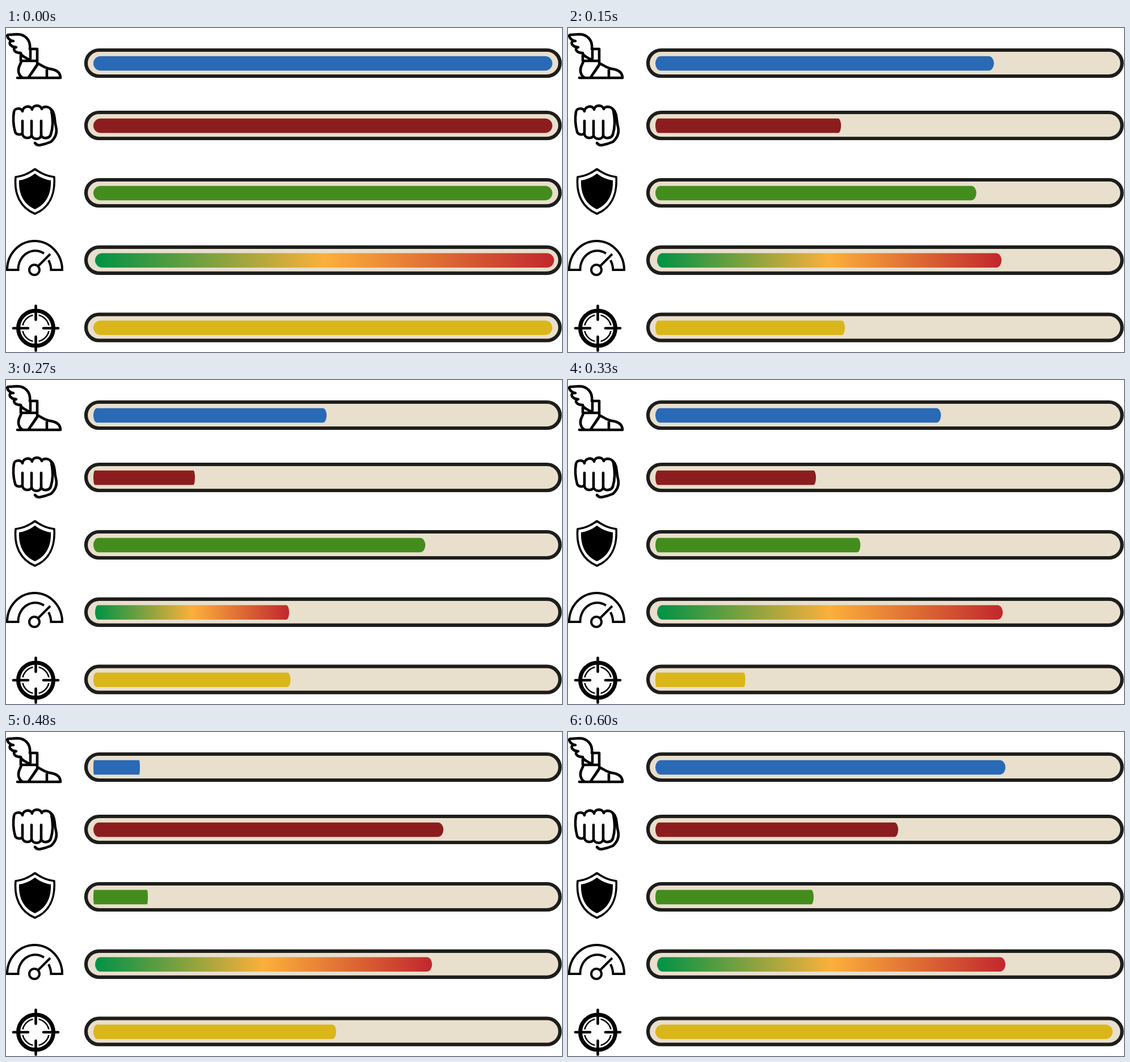
These frames come from a looping animation (980 by 572 pixels, 670 ms). An HTML page:

```html
<!DOCTYPE html>
<html lang="en">
<head>
<meta charset="utf-8">
<title>Stat bars</title>
<style>
  html, body { margin: 0; width: 100%; height: 100%; overflow: hidden; background: #fff; }
  svg { display: block; }
  .icon { fill: none; stroke: #000; stroke-width: 4.6; stroke-linecap: round; stroke-linejoin: round; }
</style>
</head>
<body>
<svg id="stage" width="980" height="572" viewBox="0 0 980 572">
  <defs>
    <linearGradient id="heat">
      <stop offset="0" stop-color="#009245"/>
      <stop offset=".5" stop-color="#fbb03b"/>
      <stop offset="1" stop-color="#c1272d"/>
    </linearGradient>
  </defs>

  <!-- winged shoe -->
  <g class="icon">
    <path d="M42 37C44 22 34 11 20 11L4 12C1 12 2 17 6 20C8 22 11 23 13 23C7 22 5 26 8 30C11 33 15 34 18 34C13 34 13 39 17 42C20 44 24 44 26 44C26 49 34 52 41 56"/>
    <path d="M43 54V37H55V61M26 48V58H55M27 59C25 66 21 68 22 77C23 82 25 85 28 87"/>
    <path d="M55 62L68 69Q74 72 82 73Q95 76 96 87M20 88H96M56 63L40 87M45 80L56 64M72 73V87" />
  </g>

  <!-- fist -->
  <g class="icon">
    <path d="M29 164V184C29 190 17 189 16 183C13 172 12 160 14 148C15 141 27 140 29 147C30 137 44 136 46 144C47 135 61 135 63 143C65 137 78 138 80 146C83 160 83 175 79 188C77 195 64 197 62 189V164M29 187C30 196 44 196 45 189V164M45 189C47 198 61 198 62 189"/>
    <path d="M80 144C87 151 85 164 88 174C91 186 87 194 79 201Q70 205 59 207Q54 207 51 203"/>
  </g>

  <!-- shield -->
  <path class="icon" style="stroke-width:3.6" d="M51 249Q67 261 85 263C87 293 77 317 51 328C25 317 14 293 17 263Q35 261 51 249Z"/>
  <path d="M51 257Q64 267 79 269C80 293 71 311 51 320C31 311 22 293 23 269Q38 267 51 257Z"/>

  <!-- gauge -->
  <g class="icon" style="stroke-width:4;stroke-linecap:butt;stroke-linejoin:miter">
    <path d="M67 398A30 33 0 0 0 21.500 427H2A48.500 51 0 0 1 99 427H79.500Q79 418 75 410M57 420L78 399"/>
    <circle cx="50" cy="427" r="9"/>
  </g>

  <!-- crosshair -->
  <g class="icon">
    <circle cx="52.500" cy="530" r="31" stroke-width="7"/>
    <circle cx="52.500" cy="530" r="23.500" stroke-width="2.500"/>
    <path stroke="#fff" stroke-width="10" stroke-linecap="butt" d="M52.500 504V514M52.500 546V556M27 530H37M68 530H78"/>
    <path d="M52.500 490.500V515M52.500 545V569.500M13 530H39M66 530H92"/>
  </g>
</svg>
<script>
const STEP = 30, LAST_STEP = 20, LOOP = 670, KEY_GAP = 4, FULL = 809;

// y: frame centre; ends: right edge of the bar at each key
const rows = [
  { y: 62,    x: 154, fill: '#2969b6', ends: [963, 828, 519, 703.5, 236, 771] },
  { y: 172,   x: 154, fill: '#8c1d1e', ends: [963, 548, 281, 489, 771, 582] },
  { y: 291,   x: 154, fill: '#448c1e', ends: [963, 676, 851, 403.5, 250, 433] },
  { y: 409.8, x: 157, fill: 'url(#heat)', ends: [966, 897, 365.5, 900, 751, 771] },
  { y: 528.7, x: 154, fill: '#dbb61a', ends: [963, 452, 596, 218, 582, 960] }
];

function addRect(attributes) {
  const rect = document.createElementNS('http://www.w3.org/2000/svg', 'rect');
  for (const name in attributes) rect.setAttribute(name, attributes[name]);
  document.getElementById('stage').append(rect);
  return rect;
}

for (const row of rows) {
  addRect({ x: 141, y: row.y - 23, width: 835.5, height: 46, rx: 23,
    fill: '#e8dfcd', stroke: '#1d1d1b', 'stroke-width': 6.2 });
  row.bar = addRect({ y: row.y - 12.2, width: FULL, height: 25.4, rx: 12.7, fill: row.fill });
}

function draw(now) {
  const step = Math.min(LAST_STEP, Math.floor(now % LOOP / STEP));
  const key = Math.min(4, Math.floor(step / KEY_GAP));
  const part = step / KEY_GAP - key;
  for (const { x, ends, bar } of rows) {
    const end = ends[key] + (ends[key + 1] - ends[key]) * part;
    bar.setAttribute('transform', `translate(${x}) scale(${(end - x) / FULL} 1)`);
  }
}

const start = performance.now();
function tick() {
  draw(performance.now() - start);
  requestAnimationFrame(tick);
}
tick();
</script>
</body>
</html>
```
